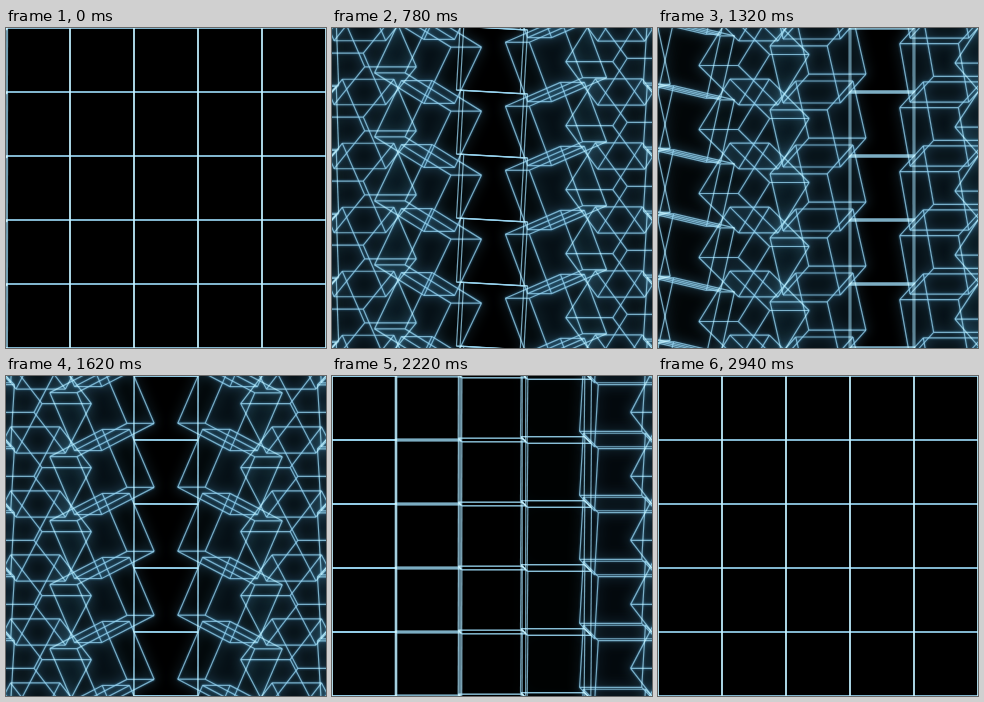
Write an HTML page without scripts that moves like this. It is 320x320 px and loops after 3 s.

```html
<!DOCTYPE html>
<html lang="en">
<head>
<meta charset="utf-8">
<title>Turning cubes</title>
<style>
@property --q { syntax: "<angle>"; inherits: true; initial-value: 0deg; }

html, body { margin: 0; width: 100%; height: 100%; overflow: hidden; background: #000; }
svg { display: block; width: 100vw; height: 100vh; background: #000; isolation: isolate; }

/* One column of cubes: each column starts 120 ms after the one to its left. */
.col {
  animation: turn 3s linear infinite backwards;
  animation-delay: calc(var(--k) * 120ms);
  --c: cos(var(--q));
  --s: sin(var(--q));
  /* projected cube axes: x = (c, 0), y = (yx, yy), z = (zx, s) */
  --yx: calc(var(--s) * var(--s));
  --yy: calc(-1 * var(--c));
  --zx: calc(var(--s) * var(--c));
  /* the glow appears only while the cubes are tilted */
  --tilt: clamp(0, 5 * hypot(var(--zx)) - .4, 1);
  filter:
    drop-shadow(0 0 1.3px rgb(70 160 215 / calc(.8 * var(--tilt))))
    drop-shadow(0 0 6px rgb(80 150 190 / calc(.75 * var(--tilt))));
  mix-blend-mode: screen;
}

@keyframes turn {
  0% { --q: 0deg; }
  3% { --q: 1deg; }
  4% { --q: 2.5deg; }
  6% { --q: 14deg; }
  8% { --q: 30deg; }
  46% { --q: 269.6deg; }
  56% { --q: 333deg; }
  58% { --q: 346deg; }
  60% { --q: 350.5deg; }
  62% { --q: 354deg; }
  66% { --q: 356.8deg; }
  70% { --q: 358.6deg; }
  74% { --q: 359.5deg; }
  80%, 100% { --q: 360deg; }
}

.x, .y, .z { fill: none; stroke: #9ad6f2; stroke-width: 1.2; stroke-opacity: .75; }
.x {
  transform:
    translate(calc(32px * (var(--i) * var(--yx) + var(--j) * var(--zx))),
              calc(32px * (var(--i) * var(--yy) + var(--j) * var(--s))))
    scaleX(var(--c));
}
.y {
  transform:
    translate(calc(32px * (var(--i) * var(--c) + var(--j) * var(--zx))),
              calc(32px * var(--j) * var(--s)))
    rotate(atan2(var(--yy), var(--yx)))
    scaleX(hypot(var(--yx), var(--yy)));
}
.z {
  transform:
    translate(calc(32px * (var(--i) * var(--c) + var(--j) * var(--yx))),
              calc(32px * var(--j) * var(--yy)))
    rotate(atan2(var(--s), var(--zx)))
    scaleX(hypot(var(--zx), var(--s)));
}

/* Faint faces, lit with the glow. */
.xy, .yz { fill: #4f93b8; opacity: calc(.02 * var(--tilt)); }
.xy {
  transform: matrix(var(--c), 0, var(--yx), var(--yy),
    calc(32 * var(--i) * var(--zx)), calc(32 * var(--i) * var(--s)));
}
.yz {
  transform: matrix(var(--yx), var(--yy), var(--zx), var(--s),
    calc(32 * var(--i) * var(--c)), 0);
}

.pp { --i: 1; --j: 1; }
.pn { --i: 1; --j: -1; }
.np { --i: -1; --j: 1; }
.nn { --i: -1; --j: -1; }
</style>
</head>
<body>
<svg viewBox="0 0 320 320">
  <defs>
    <g id="cube">
      <path class="xy pp" d="M-32-32h64v64h-64z"/>
      <path class="xy nn" d="M-32-32h64v64h-64z"/>
      <path class="yz pp" d="M-32-32h64v64h-64z"/>
      <path class="yz nn" d="M-32-32h64v64h-64z"/>
      <path class="x pp" d="M-32 0h64"/>
      <path class="x pn" d="M-32 0h64"/>
      <path class="x np" d="M-32 0h64"/>
      <path class="x nn" d="M-32 0h64"/>
      <path class="y pp" d="M-32 0h64"/>
      <path class="y pn" d="M-32 0h64"/>
      <path class="y np" d="M-32 0h64"/>
      <path class="y nn" d="M-32 0h64"/>
      <path class="z pp" d="M-32 0h64"/>
      <path class="z pn" d="M-32 0h64"/>
      <path class="z np" d="M-32 0h64"/>
      <path class="z nn" d="M-32 0h64"/>
    </g>
    <g id="stack">
      <use href="#cube" y="-32"/>
      <use href="#cube" y="32"/>
      <use href="#cube" y="96"/>
      <use href="#cube" y="160"/>
      <use href="#cube" y="224"/>
      <use href="#cube" y="288"/>
      <use href="#cube" y="352"/>
    </g>
  </defs>
  <use class="col" href="#stack" x="-32" style="--k:-1"/>
  <use class="col" href="#stack" x="32" style="--k:0"/>
  <use class="col" href="#stack" x="96" style="--k:1"/>
  <use class="col" href="#stack" x="160" style="--k:2"/>
  <use class="col" href="#stack" x="224" style="--k:3"/>
  <use class="col" href="#stack" x="288" style="--k:4"/>
  <use class="col" href="#stack" x="352" style="--k:5"/>
</svg>
</body>
</html>
```
